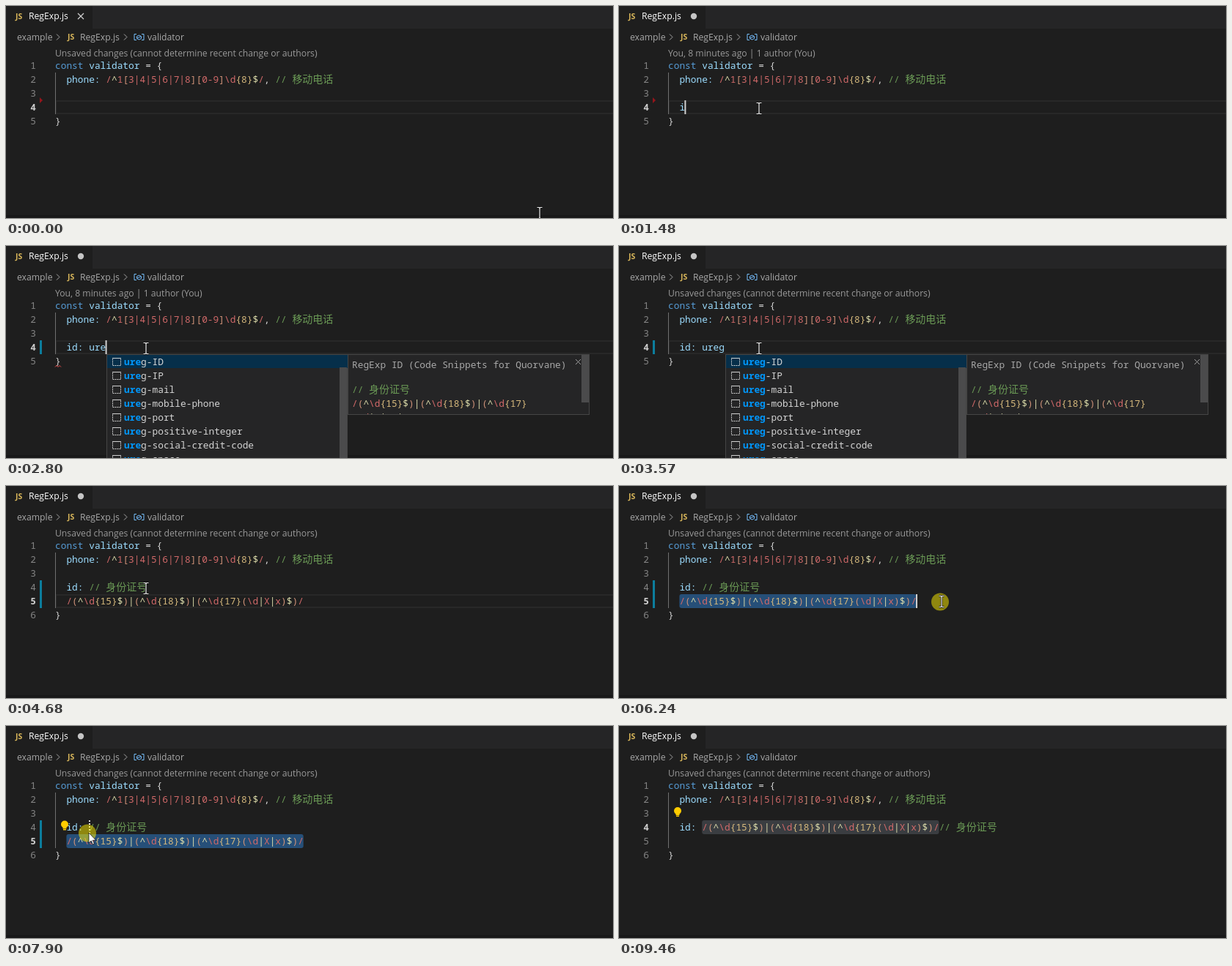
Write an HTML page that moves like this. It is 828 px wide and 290 px high and loops after 9.53 s.

```html
<!DOCTYPE html>
<html lang="en">
<head>
<meta charset="utf-8">
<title>Editor snippet demo</title>
<style>
  html, body { margin: 0; width: 100%; height: 100%; overflow: hidden; background: #1e1e1e; }
  svg { display: block; }
  text { white-space: pre; }
  .code { font: 12.83px "Noto Sans Mono", "DejaVu Sans Mono", monospace; }
  .han { font: 14px "Noto Sans CJK SC", "Noto Sans CJK", sans-serif; }
  .ui { font: 12.2px "Open Sans", "Noto Sans", sans-serif; }
  .js { font: bold 10.5px "Open Sans", "Noto Sans", sans-serif; }
  .bold { font-weight: bold; }
</style>
</head>
<body>
<svg id="stage" width="828" height="290" viewBox="0 0 828 290" xml:space="preserve"></svg>
<script>
const LOOP = 9530, CHAR = 7.698, LEFT = 67, INDENT = LEFT + 2 * CHAR;
const C = {
  plain: '#d4d4d4', name: '#9cdcfe', keyword: '#569cd6', comment: '#6a9955',
  regex: '#d16969', group: '#ce9178', anchor: '#dcdcaa', count: '#d7ba7d'
};
const PHONE = '/^1[3|4|5|6|7|8][0-9]\\d{8}$/';
const ID = '/(^\\d{15}$)|(^\\d{18}$)|(^\\d{17}(\\d|X|x)$)/';
const ITEMS = ['ID', 'IP', 'mail', 'mobile-phone', 'port', 'positive-integer', 'social-credit-code', 'space'];

// Step tables: [start time, value]
const TYPED = [[0, ''], [1480, 'i'], [1630, 'id'], [1790, 'id:'], [1960, 'id: '], [2340, 'id: u'],
  [2570, 'id: ur'], [2730, 'id: ure'], [3030, 'id: ureg'], [3720, 'id: ureg-']];
const POPUP = [[0, 0], [1710, 2], [1790, 0], [2650, 6], [2800, 7], [3110, 8], [3720, 9], [3960, 0]];
const CARET = [[0, 0], [930, 1], [3570, 0], [3720, 1], [4680, 0], [5210, 1], [6710, 0], [7240, 1],
  [7670, 0], [8210, 1], [8740, 0], [9230, 1], [9460, 0]];
const PRESSED = [[0, 0], [5590, 1], [6470, 0], [7550, 1], [8210, 0]];
const MOUSE = [[70, 728, 283], [620, 422, 150], [920, 422, 150], [1000, 191, 140], [5290, 191, 140],
  [5440, 140, 150], [5590, 80, 164], [5750, 82, 163], [6090, 231, 161], [6230, 440, 158], [6700, 440, 158],
  [6930, 370, 137], [7240, 210, 150], [7470, 135, 165], [7660, 135, 165], [7850, 113, 146],
  [8300, 113, 146], [8760, 763, 279]];
const INSERT = 3960, SELECT = 5590, DROP = 8210, BLUR = 9460;

const at = (t, steps) => steps.reduce((v, s) => t >= s[0] ? s[1] : v, steps[0][1]);
const lineTop = line => 72 + 19 * (line - 1);
const rect = (x, y, w, h, fill, more = '') =>
  `<rect x="${x}" y="${y}" width="${w}" height="${h}" fill="${fill}" ${more}/>`;
const stroke = (d, color, width = 1) =>
  `<path d="${d}" fill="none" stroke="${color}" stroke-width="${width}"/>`;
const text = (x, y, body, fill, cls = 'code', more = '') =>
  `<text x="${x}" y="${y}" fill="${fill}" class="${cls}" ${more}>${body}</text>`;
const span = (body, fill, cls = '') => `<tspan fill="${fill}" class="${cls}">${body}</tspan>`;
const comment = han => span('// ', C.comment) + span(han, C.comment, 'han');

function regex(source) {
  const parts = source.match(/\[[^\]]*\]?|\{\d+\}|\\d|[()]|[\^$|]|[^\[{\\()^$|]+/g);
  return parts.map(p => {
    if (p[0] === '[') return span('[', C.group) + span(p.slice(1, -1), C.regex) + span(']', C.group);
    if (p[0] === '{') return span(p, C.count);
    if ('()'.includes(p)) return span(p, C.group);
    return span(p, '^$|'.includes(p) ? C.anchor : C.regex);
  }).join('');
}

const key = source => span(source, C.name);

function mouseAt(t) {
  const q = Math.floor(t / 77) * 77;
  const i = MOUSE.findIndex(m => m[0] > q);
  if (i === 0) return MOUSE[0].slice(1);
  if (i < 0) return MOUSE[MOUSE.length - 1].slice(1);
  const [t0, x0, y0] = MOUSE[i - 1], [t1, x1, y1] = MOUSE[i];
  const k = (q - t0) / (t1 - t0);
  return [x0 + (x1 - x0) * k, y0 + (y1 - y0) * k];
}

function header(t) {
  const chevron = x => stroke(`M${x} 38.5l4 4-4 4`, '#a9a9a9');
  const mark = t < 1480
    ? stroke('M98 10l8 8M106 10l-8 8', '#d0d0d0', 1.2)
    : '<circle cx="102" cy="14" r="4.2" fill="#c5c5c5"/>';
  const lens = t >= 390 && t < 3190
    ? 'You, 8 minutes ago | 1 author (You)'
    : 'Unsaved changes (cannot determine recent change or authors)';
  return rect(0, 0, 828, 31, '#252526') + rect(0, 0, 118, 31, '#1e1e1e') + rect(0, 286, 828, 4, '#191919') +
    text(13, 18, 'JS', '#d7b55a', 'js') + text(31, 18, 'RegExp.js', '#fff', 'ui') + mark +
    text(15, 47, 'example', '#a9a9a9', 'ui') + chevron(69) +
    text(84, 46, 'JS', '#d7b55a', 'js') + text(101, 47, 'RegExp.js', '#a9a9a9', 'ui') + chevron(161) +
    stroke('M178 38.5h-3v8h3M185 38.5h3v8h-3M178.5 41.5l3-1.5 3 1.5v3l-3 1.5-3-1.5zM179 44l5-2.5', '#75beff') +
    text(193, 47, 'validator', '#a9a9a9', 'ui') + text(LEFT, 68.5, lens, '#999', 'ui');
}

function gutter(t, active, count) {
  let out = '';
  for (let n = 1; n <= count; n++) {
    const on = n === active;
    out += text(41, lineTop(n) + 14, n, on ? '#d0d0d0' : '#858585', on ? 'code bold' : 'code', 'text-anchor="end"');
  }
  if (t < 2190) out += '<path d="M46 125l4 4-4 4z" fill="#94151b"/>';
  else if (t < 8440) out += rect(46, 129, 3, t < 4360 ? 19 : 38, '#0c7d9d');
  return out + rect(LEFT, 91, 1, 19 * (count - 2), '#707070');
}

function code(t, count) {
  const row = (n, body, x = INDENT) => text(x, lineTop(n) + 14, body, C.plain);
  let out = row(1, span('const ', C.keyword) + span('validator', C.name) + ' = {', LEFT) +
    row(2, key('phone: ') + regex(PHONE) + ', ' + comment('移动电话')) + row(count, '}', LEFT);
  if (t < INSERT) out += row(4, key(at(t, TYPED)));
  else if (t < DROP) out += row(4, key('id: ') + comment('身份证号')) + row(5, regex(ID));
  else out += row(4, key('id: ') + regex(ID) + comment('身份证号'));
  if (t >= 2420 && t < 3190) out += stroke('M67 165.5l2-2 2 2 2-2 2 2', '#f14c4c');
  return out;
}

function label(item, query) {
  let i = 0;
  return [...('ureg-' + item)].map(ch => {
    const hit = i < query.length && ch.toLowerCase() === query[i];
    if (hit) i++;
    return hit ? span(ch, '#0097fb', 'bold') : ch;
  }).join('');
}

function popup(t, col) {
  const x = Math.round(INDENT + col * CHAR + 1), d = x + 329;
  const query = at(t, TYPED).split(' ').pop();
  let out = rect(x + .5, 148.5, 328, 160, '#252526', 'stroke="#454545"') + rect(x + 1, 149, 328, 18, '#062f4a');
  ITEMS.forEach((item, i) => {
    const y = 149 + 19 * i;
    out += rect(x + 8.5, y + 4.5, 11, 10, 'none', 'stroke="#d0d0d0" stroke-dasharray="2 1"') +
      stroke(`M${x + 8} ${y + 4.5}h12`, '#d0d0d0') + text(x + 24, y + 14, label(item, query), C.plain);
  });
  // The last detail row is cut off by the panel's lower edge.
  return out + rect(x + 318, 166, 10, 130, '#4b4b4c') +
    rect(d + .5, 148.5, 329, 82, '#252526', 'stroke="#454545"') +
    text(d + 6, 167, 'RegExp ID (Code Snippets for Quorvane)', '#a8a8a8') +
    text(d + 6, 201, comment('身份证号'), C.plain) +
    text(d + 6, 220, regex(ID.slice(0, 31)), C.plain) +
    text(d + 6, 239, regex(ID.slice(31)), C.plain) +
    rect(d + 1, 231, 329, 15, '#1e1e1e') + rect(d + 1, 230, 329, 1, '#454545') +
    rect(d + 319, 149, 10, 65, '#4b4b4c') + stroke(`M${d + 311} 155l7 7m0-7l-7 7`, '#a0a0a0');
}

const bulb = y => `<circle cx="80" cy="${y}" r="5" fill="#fc0"/>` +
  rect(77.5, y + 4, 5, 2, '#fc0') + rect(78, y + 6.5, 4, 1.5, '#fc0');

function pointer(t, [x, y], overSelection) {
  if (t >= 8830) return '';
  const beam = 'M-3.5-7.5h2.5l1 1 1-1h2.5M-3.5 7.5h2.5l1-1 1 1h2.5M0-6.5v13';
  const arrow = '<path d="M0 0v14l3.2-3 2.2 5 2-.9-2.2-4.8h4.4z" fill="#fff" stroke="#000" stroke-width=".7"/>';
  const shape = overSelection ? arrow : stroke(beam, '#111', 2.6) + stroke(beam, '#f0f0f0', 1.2);
  const halo = at(t, PRESSED)
    ? `<circle cx="${x - 2}" cy="${y + .5}" r="12" fill="#fff000" opacity=".5"/>` : '';
  return halo + `<g transform="translate(${x} ${y})">${shape}</g>`;
}

function scene(t) {
  const mouse = mouseAt(t), [mx, my] = mouse;
  const active = t >= INSERT && t < DROP ? 5 : 4;
  const count = t < INSERT ? 5 : 6;
  const dropped = t >= DROP, selecting = t >= SELECT;
  const from = dropped ? 4 : 0;
  let head = t < INSERT ? at(t, TYPED).length : from + ID.length;
  if (selecting && t < 6240) head = Math.max(0, Math.min(ID.length, Math.round((mx - INDENT) / CHAR)));

  let out = header(t);
  if (!selecting) out += rect(68, lineTop(active) + 1, 780, 17, 'none', 'stroke="#282828" stroke-width="2"');
  else out += rect(INDENT + from * CHAR, lineTop(active), (head - from) * CHAR, 19, t < BLUR ? '#264f78' : '#3a3d41', 'rx="3"');
  out += gutter(t, active, count) + code(t, count);
  if (at(t, CARET)) out += rect(INDENT + head * CHAR - .7, lineTop(active), 2, 19, '#d0d0d0');
  if (t >= 6470) out += bulb(t < DROP ? 134.5 : 116);

  const dragging = t >= 7670 && t < DROP;
  if (dragging) out += '<path d="M114 129v19" stroke="#ddd" stroke-width="2" stroke-dasharray="2 2"/>';
  const col = at(t, POPUP);
  if (col) out += popup(t, col);
  const over = t >= 6470 && !dropped && my >= 148 && my < 167 && mx > INDENT && mx < 406;
  return out + pointer(t, mouse, over || dragging);
}

const stage = document.getElementById('stage');
const began = performance.now();
let shown = '';
function draw() {
  const markup = scene((performance.now() - began) % LOOP);
  if (markup !== shown) stage.innerHTML = shown = markup;
  requestAnimationFrame(draw);
}
draw();
</script>
</body>
</html>
```
